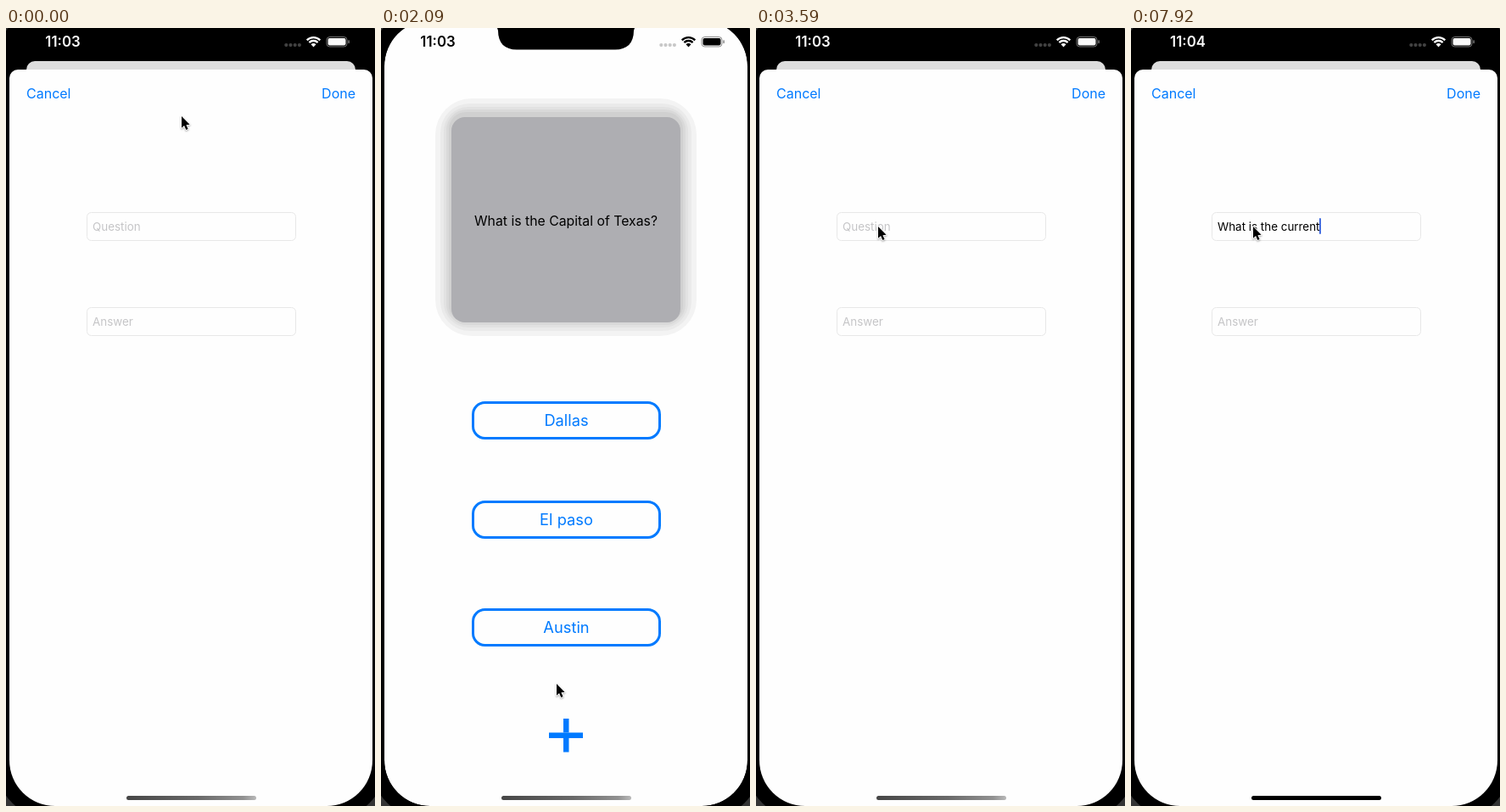
An HTML page with a canvas that plays this animation: 435 px wide and 917 px high, repeating every 8 s.

```html
<!DOCTYPE html>
<html lang="en">
<head>
<meta charset="utf-8">
<title>Flashcards</title>
<style>
  html, body { margin: 0; width: 100%; height: 100%; overflow: hidden; background: #000; }
  canvas { display: block; width: 435px; height: 917px; }
</style>
</head>
<body>
<canvas id="stage" width="435" height="917"></canvas>
<script>
const ctx = document.getElementById('stage').getContext('2d');
const LOOP = 8000;
const STEP = 150;
const DISMISS = 1113;
const PRESENT = 2503;
const BLUE = '#007aff';
const WHITE = '#fefefe';
const SCREEN = { x: 4, y: -9, w: 428, h: 926, r: 54 };

// time, x, y of the pointer tip
const POINTER = [
  [440, 207, 104], [740, 150, 95], [1040, 52, 77], [1490, 52, 77],
  [2090, 207, 773], [2390, 212, 832], [2540, 212, 832],
  [2840, 190, 660], [3590, 144, 234]
];
const SENTENCE = 'What is the current';
// time, number of characters typed
const TYPING = [
  [4640, 1], [4940, 2], [5240, 3], [5540, 4], [5680, 5],
  [5980, 6], [6130, 7], [6280, 8], [6430, 9], [6580, 10], [6730, 11], [6880, 13],
  [7030, 14], [7180, 15], [7330, 16], [7470, 17], [7620, 18], [7920, 19]
];

const clamp = (v, a = 0, b = 1) => Math.min(b, Math.max(a, v));
const mix = (a, b, k) => a + (b - a) * k;
const smooth = v => { const k = clamp(v); return k * k * (3 - 2 * k); };
const spring = ms => { const k = Math.max(0, ms) * 0.012; return 1 - (1 + k) * Math.exp(-k); };
const gray = v => { const c = Math.round(v); return `rgb(${c},${c},${c})`; };

function box(x, y, w, h, r, fill) {
  ctx.beginPath();
  ctx.roundRect(x, y, w, h, r);
  if (fill) { ctx.fillStyle = fill; ctx.fill(); }
}

function outline(x, y, w, h, r, color, width) {
  box(x + width / 2, y + width / 2, w - width, h - width, r);
  ctx.strokeStyle = color;
  ctx.lineWidth = width;
  ctx.stroke();
}

function label(str, x, y, size, color, align = 'left', weight = 400) {
  ctx.font = `${weight} ${size}px Inter, sans-serif`;
  ctx.textAlign = align;
  ctx.fillStyle = color;
  ctx.fillText(str, x, y);
}

function withAlpha(alpha, draw) {
  ctx.save();
  ctx.globalAlpha = alpha;
  draw();
  ctx.restore();
}

function pointerAt(t) {
  const last = POINTER.length - 1;
  if (t <= POINTER[0][0]) return POINTER[0].slice(1);
  for (let i = 0; i < last; i++) {
    const [t0, x0, y0] = POINTER[i], [t1, x1, y1] = POINTER[i + 1];
    if (t < t1) {
      const k = (t - t0) / (t1 - t0);
      return [mix(x0, x1, k), mix(y0, y1, k)];
    }
  }
  return POINTER[last].slice(1);
}

function drawCard(presented) {
  // spread and darkness of each shadow band
  const bands = [[19, .043], [13, .037], [9, .035], [6, .04], [3, .045]];
  if (presented > .02) bands.unshift([34, .018]);
  for (const [d, a] of bands) {
    box(83 - d, 102 - d, 270 + 2 * d, 242 + 2 * d, 16 + d * 1.4, `rgba(0,0,0,${a})`);
  }
  box(83, 105, 270, 242, 16, '#aeaeb2');
  label('What is the Capital of Texas?', 218, 232.5, 15.8, '#000', 'center');
}

function drawHome(p, t) {
  const s = 1 - .0935 * p;
  const top = mix(-9, 39, p);
  ctx.save();
  ctx.translate(218, top);
  ctx.scale(s, s);
  ctx.translate(-218, 9);
  box(SCREEN.x, SCREEN.y, SCREEN.w, SCREEN.h, mix(SCREEN.r, 10, p) / s, WHITE);
  ctx.clip();
  drawCard(p);
  [['Dallas', 440], ['El paso', 557], ['Austin', 684]].forEach(([name, y]) => {
    outline(107, y, 223, 45, 14, BLUE, 3);
    label(name, 218.5, y + 29.3, 18.3, BLUE, 'center');
  });
  withAlpha(t >= 2390 && t < 2690 ? .3 : 1, () => {
    ctx.fillStyle = BLUE;
    ctx.fillRect(198, 830.5, 40, 6.5);
    ctx.fillRect(215, 814, 6.5, 16.5);
    ctx.fillRect(215, 837, 6.5, 16.5);
  });
  ctx.restore();
  ctx.fillStyle = `rgba(0,0,0,${.128 * p})`;
  ctx.fillRect(0, 0, 435, 917);
}

function drawField(y, text, color) {
  outline(95, y, 247, 34, 5, '#e8e8e8', 1);
  label(text, 102, y + 22, 13.4, color);
}

function drawSheet(p, t, now) {
  if (p < .001) return;
  const y = mix(917, 49, p);
  const typed = TYPING.reduce((n, [at, count]) => now >= at ? count : n, 0);
  const text = SENTENCE.slice(0, typed);
  box(4, y, 428, 930, 10, WHITE);
  withAlpha(t >= 1040 && t < 1640 ? .3 : 1, () => label('Cancel', 24, y + 34, 16, BLUE));
  label('Done', 412, y + 34, 16, BLUE, 'right');
  drawField(y + 168, text || 'Question', text ? '#000' : '#c5c5c7');
  if (now >= 4040) {
    const caret = 102 + (text ? ctx.measureText(text).width - .5 : 0);
    box(caret, y + 175, 2, 19, 1, '#416be0');
  }
  drawField(y + 280, 'Answer', '#c5c5c7');
}

function drawStatus(light, now) {
  const ink = gray(mix(0, 250, light));
  label(now < 7330 ? '11:03' : '11:04', 67, 22.2, 16.8, ink, 'center', 600);
  for (let i = 0; i < 4; i++) {
    box(328.2 + i * 5.2, 18, 4.2, 4.2, 2.1, gray(mix(200, 66, light)));
  }
  ctx.strokeStyle = ctx.fillStyle = ink;
  ctx.lineWidth = 2.3;
  const a0 = -Math.PI * .75, a1 = -Math.PI * .25;
  for (const r of [11, 7.2]) {
    ctx.beginPath();
    ctx.arc(362.5, 22.2, r, a0, a1);
    ctx.stroke();
  }
  ctx.beginPath();
  ctx.moveTo(362.5, 22.6);
  ctx.arc(362.5, 22.2, 4.2, a0, a1);
  ctx.fill();
  withAlpha(.45, () => {
    outline(377.5, 10, 25, 12.5, 3.6, ink, 1);
    box(403.3, 14.3, 1.6, 4, 1, ink);
  });
  box(379.5, 12, 21, 8.5, 2, ink);
}

function drawNotch() {
  ctx.fillStyle = '#000';
  ctx.beginPath();
  ctx.moveTo(137, 0);
  ctx.lineTo(138, 3);
  ctx.bezierCurveTo(138, 18, 146, 25.5, 160, 25.5);
  ctx.lineTo(276, 25.5);
  ctx.bezierCurveTo(290, 25.5, 298, 18, 298, 3);
  ctx.lineTo(299, 0);
  ctx.fill();
}

function drawHomeBar(now) {
  const k = clamp((now - 4640) / 300);
  const g = ctx.createLinearGradient(142, 0, 295, 0);
  [[0, 70], [.55, 105], [.9, 145], [1, 185]].forEach(([at, v]) =>
    g.addColorStop(at, gray(v * (1 - k))));
  box(142, 905, 153, 5, 2.5, g);
}

function drawPointer([x, y]) {
  ctx.save();
  ctx.translate(x, y);
  ctx.beginPath();
  [[0, 0], [0, 13.8], [3.1, 11], [5.3, 16], [7.6, 15], [5.4, 10.2], [9.6, 9.8]]
    .forEach(([px, py]) => ctx.lineTo(px, py));
  ctx.closePath();
  ctx.shadowColor = 'rgba(0,0,0,.35)';
  ctx.shadowBlur = 2;
  ctx.shadowOffsetY = 1;
  ctx.strokeStyle = '#fff';
  ctx.lineWidth = 1.8;
  ctx.lineJoin = 'round';
  ctx.stroke();
  ctx.shadowColor = 'transparent';
  ctx.fillStyle = '#000';
  ctx.fill();
  ctx.restore();
}

function render(now) {
  const t = clamp(1190 + STEP * Math.floor((now - 1190) / STEP), 440, 3590);
  const opening = t >= PRESENT;
  const p = opening ? spring(t - PRESENT) : 1 - spring(t - DISMISS);
  const light = opening ? smooth((t - PRESENT) / 550) : 1 - smooth((t - DISMISS) / 550);

  ctx.fillStyle = '#333';
  ctx.fillRect(0, 0, 435, 917);
  box(-13, -26, 462, 960, 70, '#000');
  ctx.save();
  box(SCREEN.x, SCREEN.y, SCREEN.w, SCREEN.h, SCREEN.r);
  ctx.clip();
  drawHome(p, t);
  drawSheet(p, t, now);
  drawNotch();
  drawStatus(light, now);
  drawHomeBar(now);
  ctx.restore();
  drawPointer(pointerAt(t));
}

const start = performance.now();
function tick() {
  render((performance.now() - start) % LOOP);
  requestAnimationFrame(tick);
}
tick();
</script>
</body>
</html>
```
